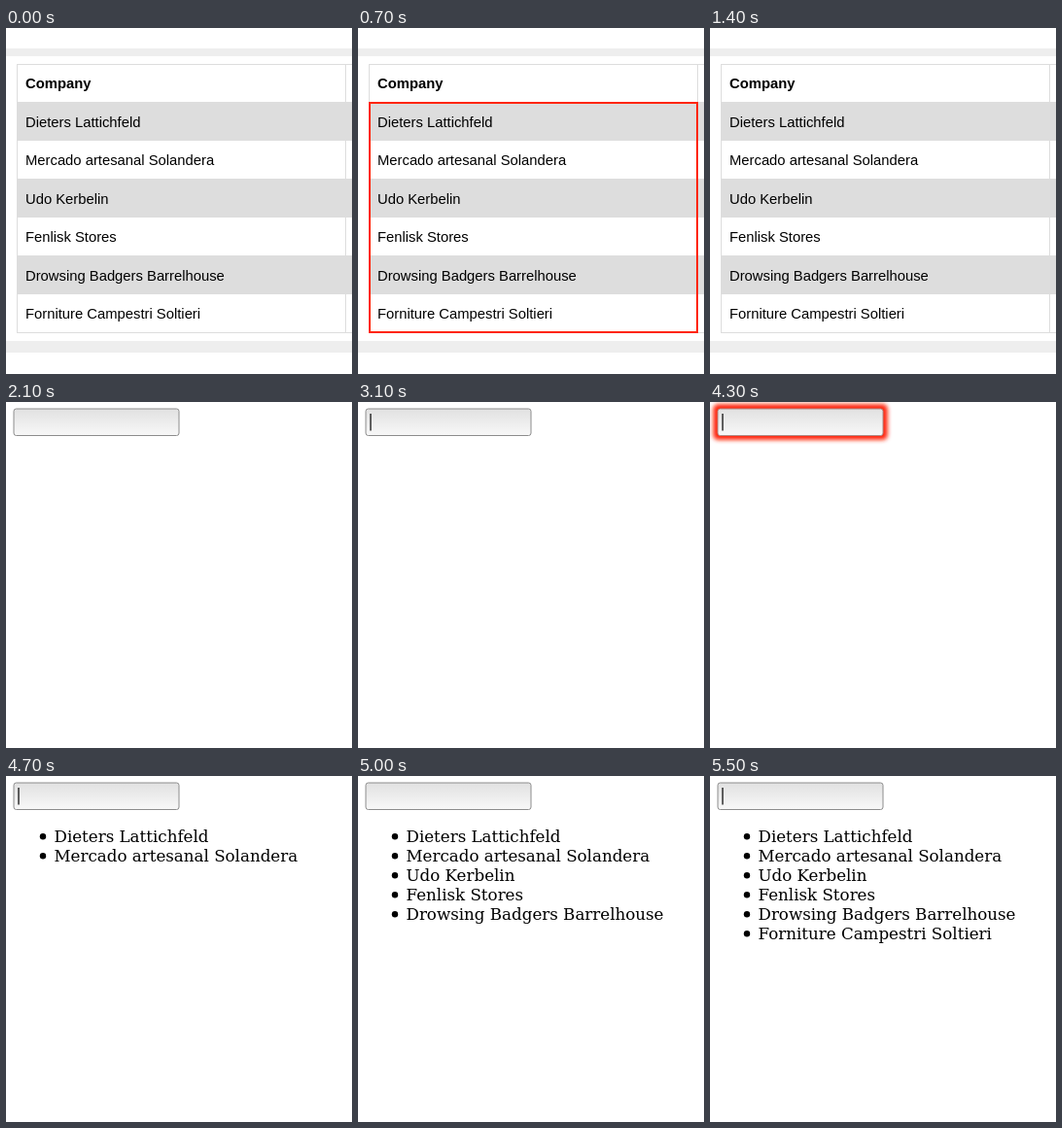
An HTML page that plays this animation: 356x356 px, repeating every 5.7 s.

```html
<!DOCTYPE html>
<html lang="en">
<head>
<meta charset="utf-8">
<title>Column to list</title>
<style>
  html, body { margin: 0; width: 100%; height: 100%; overflow: hidden; background: #fff; }
  svg { display: block; width: 100%; height: 100%; }
  .cell { font: 14.8px "Liberation Sans", Arial, sans-serif; }
  .head { font-weight: bold; }
  .item { font: 16.7px "DejaVu Serif", serif; }
</style>
</head>
<body>
<svg id="stage" viewBox="0 0 356 356">
  <defs>
    <linearGradient id="face" x1="0" y1="0" x2="0" y2="1">
      <stop offset="0" stop-color="#e1e1e1"/>
      <stop offset="1" stop-color="#f8f8f8"/>
    </linearGradient>
    <filter id="soft" x="-20%" y="-50%" width="140%" height="200%">
      <feGaussianBlur stdDeviation="2.3"/>
    </filter>
  </defs>
  <g id="table"></g>
  <g id="form">
    <rect id="glow" x="3.3" y="2.3" width="179.4" height="36.6" rx="5" fill="#ff2508" filter="url(#soft)"/>
    <rect id="field" x="8" y="7" width="170" height="27.5" rx="2.5" fill="url(#face)"/>
    <rect id="caret" x="12.4" y="12" width="1.2" height="17.5"/>
    <g id="list"></g>
  </g>
</svg>
<script>
const LOOP = 5700;
const BLINK = 200;
const ROW = 39.5;
const names = [
  "Dieters Lattichfeld",
  "Mercado artesanal Solandera",
  "Udo Kerbelin",
  "Fenlisk Stores",
  "Drowsing Badgers Barrelhouse",
  "Forniture Campestri Soltieri"
];

const $ = id => document.getElementById(id);

function add(parent, tag, attrs, text) {
  const el = document.createElementNS("http://www.w3.org/2000/svg", tag);
  for (const key in attrs) el.setAttribute(key, attrs[key]);
  if (text) el.textContent = text;
  parent.appendChild(el);
  return el;
}

function show(el, on) {
  el.style.display = on ? "" : "none";
}

const box = (parent, x, y, width, height, fill) =>
  add(parent, "rect", { x, y, width, height, fill });

function buildTable() {
  const table = $("table");
  box(table, 0, 21, 356, 8, "#eee");
  box(table, 0, 322, 356, 12, "#eee");
  for (let i = 0; i < 3; i++) {
    box(table, 11, Math.round(76.4 + i * 2 * ROW), 345, 40, "#ddd");
  }
  box(table, 11, 37, 345, 1, "#ddd");
  box(table, 11, 313, 345, 1, "#ddd");
  box(table, 11, 37, 1, 277, "#ddd");
  box(table, 349, 37, 1, 277, "#ddd");
  add(table, "text", { x: 20, y: 62, class: "cell head" }, "Company");
  names.forEach((name, i) =>
    add(table, "text", { x: 20, y: Math.round(102 + i * ROW - 0.1), class: "cell" }, name));
  return add(table, "rect", {
    x: 12, y: 77, width: 337, height: 236, fill: "none", stroke: "#ff2508", "stroke-width": 2
  });
}

function buildList() {
  return names.map((name, i) => {
    const item = add($("list"), "g", { transform: `translate(0 ${i * 20})` });
    add(item, "circle", { cx: 38, cy: 62.3, r: 3.2 });
    add(item, "text", { x: 49.5, y: 67.5, class: "item" }, name);
    return item;
  });
}

const mark = buildTable();
const items = buildList();

function draw(t) {
  const form = t >= 2100;
  const glowing = t >= 3300 && t < 4500;
  show($("table"), !form);
  show($("form"), form);
  show(mark, t >= 700 && t < 1400);
  show($("glow"), glowing);
  $("field").setAttribute("stroke", glowing ? "#b08a86" : "#8c8c8c");
  show($("caret"), Math.floor((t - 2100) / BLINK) % 2 === 1);
  // one more item every 100 ms
  items.forEach((item, i) => show(item, t >= 4600 + i * 100));
}

function tick() {
  draw(performance.now() % LOOP);
  requestAnimationFrame(tick);
}
tick();
</script>
</body>
</html>
```
